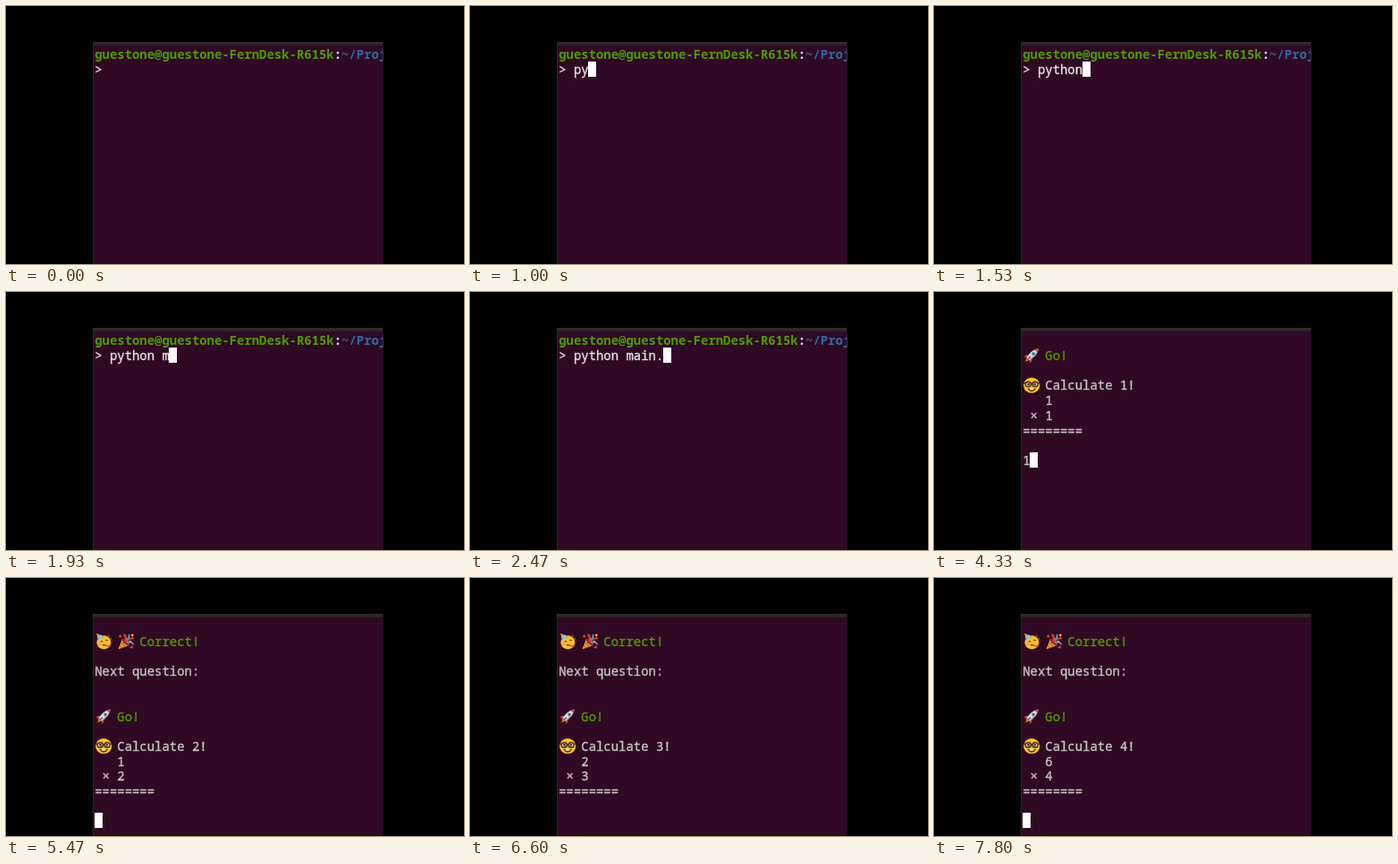
Write an HTML page with a canvas that moves like this. It is 512 px wide and 288 px high and loops after 8000 ms.

```html
<!DOCTYPE html>
<html lang="en">
<head>
<meta charset="utf-8">
<title>Terminal quiz</title>
<style>
html, body { margin: 0; width: 100%; height: 100%; overflow: hidden; background: #000; }
canvas { display: block; }
</style>
</head>
<body>
<canvas width="512" height="288"></canvas>
<script>
const ctx = document.querySelector('canvas').getContext('2d');
const LOOP = 8000, LEFT = 99.2, TOP = 45.4, COL = 8.36, ROW = 16.7;
const GREEN = '#4e9a06', BLUE = '#3465a4', GREY = '#c8c5c2', WHITE = '#e6e3e2';
const COMMAND = 'python main.py';
const HIDDEN = [[0, 300], [3730, 4330], [5130, 5470], [6600, 7000]];
// start, question number, factors, answer, time the answer is typed
const ROUNDS = [
  [3270, 1, 1, 1, '1', 4330],
  [4600, 2, 1, 2, '2', 5530],
  [6000, 3, 2, 3, '6', 7130],
  [7600, 4, 6, 4, '', LOOP]
];

function text(str, col, row, color, weight = 400) {
  ctx.font = weight + ' 13.95px "Noto Sans Mono", "DejaVu Sans Mono", monospace';
  ctx.fillStyle = ctx.strokeStyle = color;
  ctx.lineWidth = .35;
  [...str].forEach((ch, i) => {
    const x = LEFT + (col + i) * COL, y = TOP + row * ROW + 13.9;
    ctx.fillText(ch, x, y);
    if (weight < 700) ctx.strokeText(ch, x, y);
  });
}

function cursor(col, row, t) {
  if (HIDDEN.some(([from, to]) => t >= from && t < to)) return;
  ctx.fillStyle = '#fff';
  ctx.fillRect(Math.floor(LEFT + col * COL), Math.floor(TOP + row * ROW), 9, 17);
}

function shape(color, path) {
  ctx.fillStyle = color;
  ctx.fill(new Path2D(path));
}

function line(color, width, path) {
  ctx.strokeStyle = color;
  ctx.lineWidth = width;
  ctx.stroke(new Path2D(path));
}

function disc(color, x, y, rx, ry = rx) {
  ctx.fillStyle = color;
  ctx.beginPath();
  ctx.ellipse(x, y, rx, ry, 0, 0, 7);
  ctx.fill();
}

// Icons are drawn in an 18 x 18 box
const icons = {
  rocket() {
    ctx.translate(9, 8.7);
    ctx.rotate(Math.PI / 4);
    shape('#f0a030', 'M-1.6 6 L0 10 L1.6 6Z');
    shape('#b8473f', 'M-2.2 1 L-5 5 L-4.4 7.6 L-1.6 5.5Z M2.2 1 L5 5 L4.4 7.6 L1.6 5.5Z');
    shape('#d5dde2', 'M0 -10.5 C3.8 -6 3.5 1 2 6 H-2 C-3.5 1 -3.8 -6 0 -10.5Z');
    shape('#9fb0ba', 'M0 -10.5 C3.8 -6 3.5 1 2 6 H.8 C1.8 1 1.8 -6 0 -10.5Z');
    shape('#c9504a', 'M0 -10.5 Q1.7 -8.6 2.3 -6.8 H-2.3 Q-1.7 -8.6 0 -10.5Z');
    disc('#376f9c', 0, -2.5, 1.7);
    shape('#8f3a3a', 'M-.6 2 H.6 V7 H-.6Z');
  },
  nerd() {
    disc('#fbc02d', 9, 8.9, 9.1, 8.6);
    disc('#f3dfa5', 5.2, 7.6, 2.8, 2.4);
    disc('#f3dfa5', 12.8, 7.6, 2.8, 2.4);
    disc('#493124', 5.4, 7.6, 1.4);
    disc('#493124', 12.6, 7.6, 1.4);
    line('#493124', 1.5, 'M2 7.6a3.1 2.7 0 1 0 6.2 0a3.1 2.7 0 1 0 -6.2 0' +
      'M9.8 7.6a3.1 2.7 0 1 0 6.2 0a3.1 2.7 0 1 0 -6.2 0M8 7h2M0 6.5h2.2M15.8 6.5h2.2');
    shape('#5c3b22', 'M4.3 12 Q9 13.3 13.7 12 Q12.4 16 9 16 Q5.6 16 4.3 12Z');
    shape('#fff', 'M6.8 12.5h4.4v1.5h-4.4Z');
  },
  party() {
    disc('#fbc02d', 9.2, 10, 8, 7.7);
    shape('#6eaec6', 'M1.5 .5 L10 2.5 L3 8Z');
    line('#f1d28a', 1.2, 'M3.4 1.3 L2.5 5 M6.3 2 L4.4 6.6');
    disc('#d9635a', 1.8, 1, 1.1);
    line('#5c3b22', 1.1, 'M5.5 9.5 Q6.7 7.8 8 9.4 M11 8 Q12.3 6.6 13.5 8.2');
    disc('#f08a3c', 5, 12.3, 1.5, 1);
    line('#d8533e', 1.8, 'M9.5 13 L14 14.3 Q16.6 14.7 16 12.7');
    disc('#5c3b22', 9, 13, 1.1);
    disc('#d84f7a', 15, 2.8, .9);
    disc('#4a9fd0', 17, 6, .8);
  },
  popper() {
    shape('#f5b335', 'M.3 17.5 L4.6 6 Q10.5 7 12.5 13Z');
    line('#c9602c', 1.6, 'M3.4 10 L8 15 M2 13.4 L4.8 16.2');
    ctx.save();
    ctx.translate(8.6, 9.4);
    ctx.rotate(Math.PI / 4);
    disc('#8c2f37', 0, 0, 5.3, 2.5);
    ctx.restore();
    line('#d8463f', 2.2, 'M8 9 Q10.5 5 6.5 1 M9.5 9.5 Q12 4.5 17.5 5.5');
    line('#4a9fd0', 1.7, 'M10 10.5 Q14.5 8 17.5 12.5 M10 7 Q13 4.5 12 .8');
    disc('#d8463f', 2.4, 3, 1.5);
    disc('#f5b335', 16, 2, 1.4);
    disc('#d8463f', 15.2, 15.4, 1.5);
    disc('#f5b335', 13.7, 9, 1.1);
  }
};

function icon(name, col, row) {
  ctx.save();
  ctx.translate(LEFT + col * COL + 1, TOP + row * ROW - .2);
  icons[name]();
  ctx.restore();
}

function shell(t) {
  text('guestone@guestone-FernDesk-R615k', 0, 0, GREEN, 700);
  text(':', 32, 0, WHITE, 700);
  text('~/Projects', 33, 0, BLUE, 700);
  text('>', 0, 1, WHITE);
  const count = Math.max(0, Math.min(COMMAND.length, 1 + Math.floor((t - 730) / 157)));
  text(COMMAND.slice(0, count), 2, 1, WHITE);
  if (t < 3130) cursor(2 + count, 1, t);
  else cursor(0, 2, t);
}

function quiz([, number, a, b, answer, typedAt], t) {
  let row = 1;
  if (number > 1) {
    icon('party', 0, 1);
    icon('popper', 3, 1);
    text('Correct!', 6, 1, GREEN);
    text('Next question:', 0, 3, GREY);
    row = 6;
  }
  icon('rocket', 0, row);
  text('Go!', 3, row, GREEN);
  icon('nerd', 0, row + 2);
  text(`Calculate ${number}!`, 3, row + 2, GREY);
  text(String(a), 3, row + 3, GREY);
  text('× ' + b, 1, row + 4, GREY);
  text('========', 0, row + 5, GREY);
  const typed = t >= typedAt ? answer : '';
  text(typed, 0, row + 7, GREY);
  cursor(typed.length, row + 7, t);
}

function draw(t) {
  ctx.fillStyle = '#000';
  ctx.fillRect(0, 0, 512, 288);
  ctx.save();
  ctx.beginPath();
  ctx.rect(97, 40, 324.5, 248);
  ctx.clip();
  ctx.fillStyle = '#2c2a2b';
  ctx.fillRect(97, 40, 325, 248);
  ctx.fillStyle = '#300a24';
  ctx.fillRect(98, 43.6, 323, 245);
  const round = ROUNDS.filter(r => t >= r[0]).pop();
  if (round) quiz(round, t);
  else shell(t);
  ctx.restore();
}

let start;
function frame(now) {
  start ??= now;
  draw((now - start) % LOOP);
  requestAnimationFrame(frame);
}
requestAnimationFrame(frame);
</script>
</body>
</html>
```
